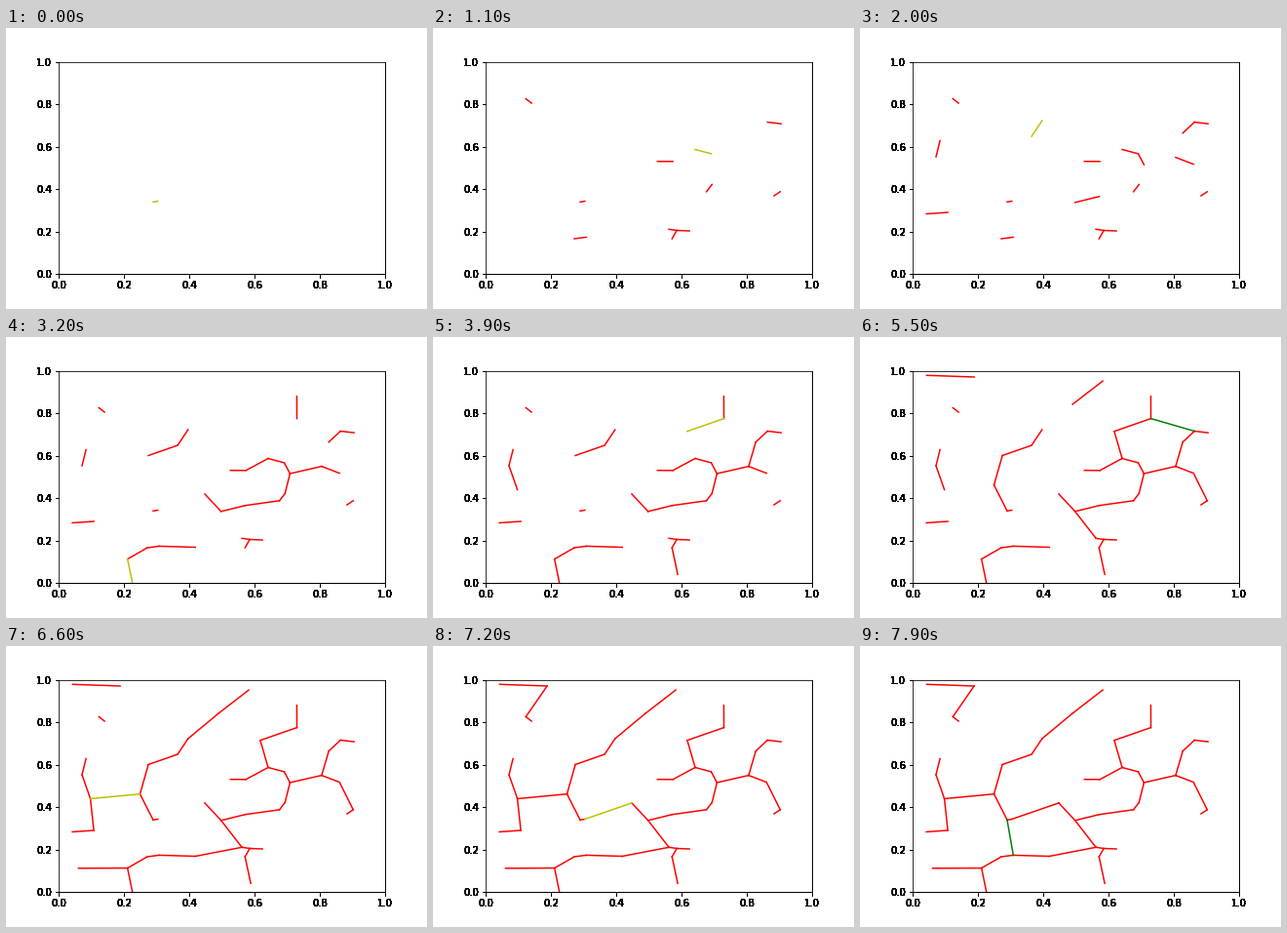
Write a matplotlib script that moves like this. It is 432x288 px and loops after 8000 ms.

```python
from itertools import combinations

import matplotlib.pyplot as plt
import numpy as np
from matplotlib.animation import FuncAnimation
from matplotlib.collections import LineCollection

W, H, DPI = 432, 288, 72
LEFT, BOTTOM, RIGHT, TOP = 54, 252, 388.8, 34.56
FRAMES, STEP_MS = 80, 100
OVERDRAW = 40

# The sites to connect, in stage pixels; edges, order and colours follow from them
SITES = np.array([
    (150.9, 177.8), (155.7, 177), (95.2, 72), (101, 76.5), (82, 115), (77.9, 131.5),
    (68, 190), (90, 188.5), (144.9, 215.5), (157.2, 213.9), (176, 110.5), (186.7, 94.5),
    (230.2, 136.2), (246, 136.3), (220.6, 178.3), (245.4, 172.2), (268.9, 124),
    (285.4, 128.4), (291.3, 139.5), (280.5, 167.3), (286.2, 159.9), (331.1, 107.2),
    (343.1, 96), (357, 97.6), (323.8, 132.1), (342.1, 139.1), (349.8, 171.5),
    (356.2, 167.3), (242, 205.8), (250, 207), (263, 207.5), (245.2, 215.5),
    (298.3, 60.3), (298.4, 83.1), (203.9, 160.4), (146, 121), (124.6, 227.1),
    (129.6, 251.5), (194.2, 215), (86.5, 156), (137.4, 151.2), (260.8, 96.2),
    (251, 242.8), (68.3, 38.8), (117, 40.5), (218, 68.5), (249, 44.6), (74.3, 227.3),
])
PIXEL_CENTRE = (0.1, 0.5)
POINTS = (SITES + PIXEL_CENTRE - (LEFT, BOTTOM)) / (RIGHT - LEFT, TOP - BOTTOM)


def kruskal(points, steps):
    """Visit the shortest edges in order; return (edge, accepted) pairs."""
    parent = list(range(len(points)))

    def find(i):
        while parent[i] != i:
            i = parent[i]
        return i

    edges = sorted(combinations(range(len(points)), 2),
                   key=lambda e: np.hypot(*(points[e[0]] - points[e[1]])))
    visits = []
    for a, b in edges[:steps]:
        ra, rb = find(a), find(b)
        parent[ra] = rb
        visits.append((points[[a, b]], ra != rb))
    return visits


def harden(img, dpi):
    """Darken soft edges as if the artist were painted many times over."""
    out = img.copy()
    out[..., 3] = 1 - (1 - img[..., 3]) ** OVERDRAW
    return out, 0, 0


VISITS = kruskal(POINTS, FRAMES)

fig = plt.figure(figsize=(W / DPI, H / DPI), dpi=DPI, facecolor="white")
ax = fig.add_axes([LEFT / W, 1 - BOTTOM / H, (RIGHT - LEFT) / W, (BOTTOM - TOP) / H],
                  xlim=(0, 1), ylim=(0, 1))
tree = ax.add_collection(LineCollection([], linewidths=1.5, capstyle="projecting"),
                         autolim=False)
for artist in (ax.xaxis, ax.yaxis, ax.spines["bottom"], ax.spines["right"]):
    artist.set_agg_filter(harden)


def draw(i):
    kept = [edge for edge, accepted in VISITS[:i] if accepted]
    edge, accepted = VISITS[i]
    tree.set_segments(kept + [edge])
    tree.set_color(["r"] * len(kept) + ["y" if accepted else "g"])
    return [tree]


anim = FuncAnimation(fig, draw, frames=FRAMES, interval=STEP_MS,
                     repeat=True, repeat_delay=0, blit=False)
plt.show()
```
